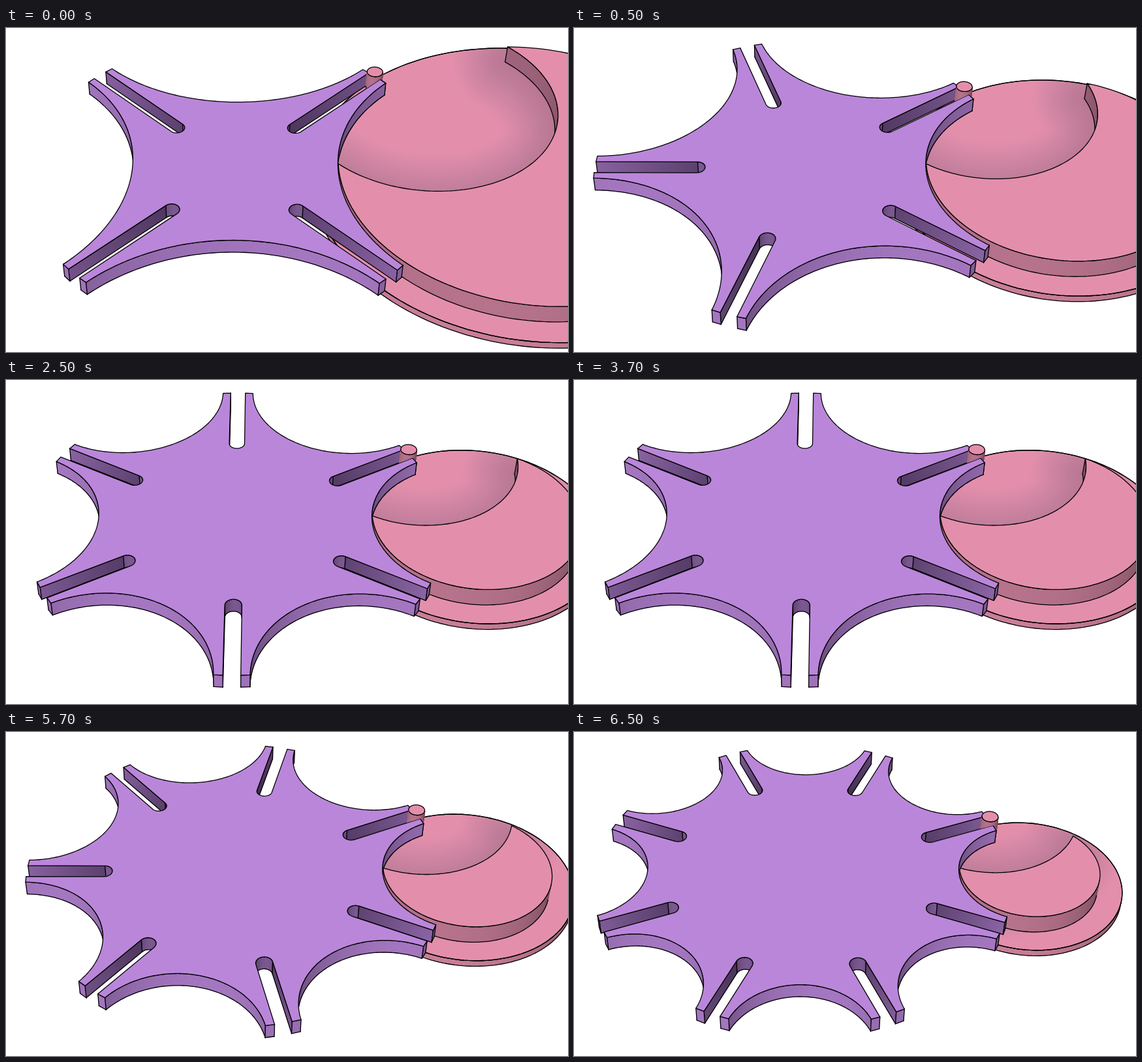
Animation, 861 px wide and 497 px high, one loop 8000 ms. Source, as an HTML page with a canvas:

```html
<!DOCTYPE html>
<html lang="en">
<head>
<meta charset="utf-8">
<title>Geneva drive</title>
<style>
  html, body { margin: 0; width: 100%; height: 100%; overflow: hidden; background: #fff; }
  canvas { display: block; width: 100vw; height: 100vh; }
</style>
</head>
<body>
<canvas id="stage" width="861" height="497"></canvas>
<script>
const ctx = document.getElementById('stage').getContext('2d');
const { PI, cos, sin, sqrt, acos, atan2 } = Math;

const PURPLE = [186, 134, 218], PINK = [227, 143, 172];
const SLOT = 0.0388;              // half the slot width, wheel radius = 1
const WALL = 0.079;               // slot axis to outer prong corner
const PIN = 0.04, LIP = 0.041;
// Heights, measured downwards from the wheel's top face in wheel thicknesses
const RAISED = -0.35, FLOOR = 0.93, UNDER = 1.4;

// Perspective view of the point (x, y) at depth z
function project([x, y], z) {
  const d = 1 + 0.1032 * y + 0.008 * z;
  return [(351.2 + 319.2 * x + 41 * y + 2.8 * z) / d,
          (214.2 + x - 192.1 * y + 20.2 * z) / d];
}

const turn = ([x, y], a) => [x * cos(a) - y * sin(a), x * sin(a) + y * cos(a)];
const rgb = (c, k) => `rgb(${c.map(v => Math.round(v * k)).join()})`;

function arc(cx, cy, r, from, to, steps = 90) {
  return Array.from({ length: steps + 1 }, (_, i) => {
    const a = from + (to - from) * i / steps;
    return [cx + r * cos(a), cy + r * sin(a)];
  });
}

function trace(pts, close = true) {
  ctx.beginPath();
  pts.forEach(p => ctx.lineTo(p[0], p[1]));
  if (close) ctx.closePath();
}

function ink() {
  ctx.strokeStyle = '#000';
  ctx.lineWidth = 1.3;
  ctx.stroke();
}

function inkLine(...pts) {
  trace(pts, false);
  ink();
}

// Light on a wall running from p to q with the solid on its left
function light(p, q) {
  const dx = q[0] - p[0], dy = q[1] - p[1], len = Math.hypot(dx, dy) || 1;
  return 0.62 + 0.24 * dx / len - 0.1 * dy / len;
}

// Visible runs of one outline piece; only true corners get an upright edge
function facingRuns(piece, top, bottom) {
  const runs = [], last = piece.pts.length - 1;
  let run = null;
  for (let i = 0; i < last; i++) {
    const p = piece.pts[i], q = piece.pts[i + 1];
    const a = project(p, top), b = project(q, top), c = project(p, bottom);
    const facing = (b[0] - a[0]) * (c[1] - a[1]) - (b[1] - a[1]) * (c[0] - a[0]) > 0;
    if (!facing) { run = null; continue; }
    if (!run) runs.push(run = { pts: [p], dark: piece.dark, startEdge: i === 0 });
    run.pts.push(q);
    run.endEdge = i + 1 === last;
  }
  runs.forEach(r => r.y = r.pts.reduce((s, p) => s + p[1], 0) / r.pts.length);
  return runs;
}

function drawRun(run, top, bottom, color) {
  const up = run.pts.map(p => project(p, top));
  const down = run.pts.map(p => project(p, bottom));
  const end = up.length - 1;
  for (let i = 0; i < end; i++) {
    trace([up[i], up[i + 1], down[i + 1], down[i]]);
    ctx.fillStyle = ctx.strokeStyle = rgb(color, light(run.pts[i], run.pts[i + 1]));
    ctx.lineWidth = 0.8;
    ctx.fill();
    ctx.stroke();
  }
  if (run.dark) {
    trace([...up, ...[...down].reverse()]);
    const g = ctx.createLinearGradient(...up[0], ...up[end]);
    run.dark.forEach((v, i) => g.addColorStop(i, `rgba(25,15,35,${v})`));
    ctx.fillStyle = g;
    ctx.fill();
  }
  inkLine(...up);
  inkLine(...down);
  if (run.startEdge) inkLine(up[0], down[0]);
  if (run.endEdge) inkLine(up[end], down[end]);
}

// Extruded outline: walls from far to near, then the lid
function solid(pieces, top, bottom, color) {
  pieces.flatMap(p => facingRuns(p, top, bottom))
    .sort((a, b) => b.y - a.y)
    .forEach(r => drawRun(r, top, bottom, color));
  trace(pieces.flatMap(p => p.pts).map(p => project(p, top)));
  ctx.fillStyle = rgb(color, 1);
  ctx.fill();
  ink();
}

const disc = (x, y, r, dark) => [{ pts: arc(x, y, r, PI / 2, PI * 2.5, 180), dark }];

function wheelOutline(n, c, a, r) {
  const half = PI / n, mouth = sqrt(1 - SLOT * SLOT), end = c - a;
  const phi = acos((1 + c * c - r * r) / (2 * c));
  const beta = atan2(sin(phi), cos(phi) - c);
  const edge = half - phi, corner = [cos(edge), sin(edge)];
  const pieces = [];
  for (let i = 0; i < n; i++) {
    const at = (2 * i + 1) * half;
    const add = (pts, dark) => pieces.push({ pts: pts.map(p => turn(p, at)), dark });
    add([[corner[0], -corner[1]], [mouth, -SLOT]]);
    add([[mouth, -SLOT], [end, -SLOT]], [0.18, 0.5]);
    add(arc(end, 0, SLOT, PI * 1.5, PI / 2, 24), [0.3, 0.3]);
    add([[end, SLOT], [mouth, SLOT]], [0.5, 0.18]);
    add([[mouth, SLOT], corner]);
    add(arc(c, 0, r, 2 * PI - beta, beta).map(p => turn(p, half)));
  }
  return pieces;
}

// Soft shade along a line on the floor
function softLine(pts, reach, alpha) {
  ctx.strokeStyle = `rgba(60,35,45,${alpha})`;
  trace(pts.map(p => project(p, FLOOR)), false);
  for (let i = 1; i <= 24; i++) {
    ctx.lineWidth = reach * 2 * i / 24;
    ctx.stroke();
  }
}

function draw(n) {
  const half = PI / n, c = 1 / cos(half), a = Math.tan(half), r = a - WALL;
  ctx.lineJoin = ctx.lineCap = 'round';
  ctx.fillStyle = '#fff';
  ctx.fillRect(0, 0, 861, 497);

  const base = disc(c, 0, a + LIP);
  solid(base, FLOOR, UNDER, PINK);

  // Locking disc with a round pocket that passes through the crank axis
  const pocket = r / (2 * sin(half)), aim = PI / 2 + half;
  const rim = arc(c, 0, r, PI, 2 * PI + 2 * half, 140);
  const cut = arc(c + pocket * cos(aim), pocket * sin(aim), pocket,
                  PI * 1.5 + 3 * half, PI * 1.5 - half);
  ctx.save();
  trace(base[0].pts.map(p => project(p, FLOOR)));
  ctx.clip();
  softLine(cut, 80, 0.009);
  ctx.restore();
  trace(base[0].pts.map(p => project(p, FLOOR)));
  ink();
  solid([{ pts: rim, dark: [0.1, 0.1] }, { pts: cut, dark: [0.22, 0.15] }],
        RAISED, FLOOR, PINK);

  const wheel = wheelOutline(n, c, a, r);
  solid(wheel, 0, 1, PURPLE);
  solid(disc(cos(half), sin(half), PIN, [0.1, 0.1]), RAISED, FLOOR, PINK);

  // The prong in front of the pin covers its foot
  ctx.save();
  trace([[c - a, -SLOT], [1.2, -SLOT], [1.2, -0.35], [c - a, -0.35]]
    .map(p => project(turn(p, half), 0)));
  ctx.clip();
  solid(wheel, 0, 1, PURPLE);
  ctx.restore();
}

let shown = 0;
function tick() {
  const t = performance.now() % 8000;
  const slots = 4 + Math.floor((t + 1500) / 2000);
  if (slots !== shown) draw(shown = slots);
  requestAnimationFrame(tick);
}
tick();
</script>
</body>
</html>
```
